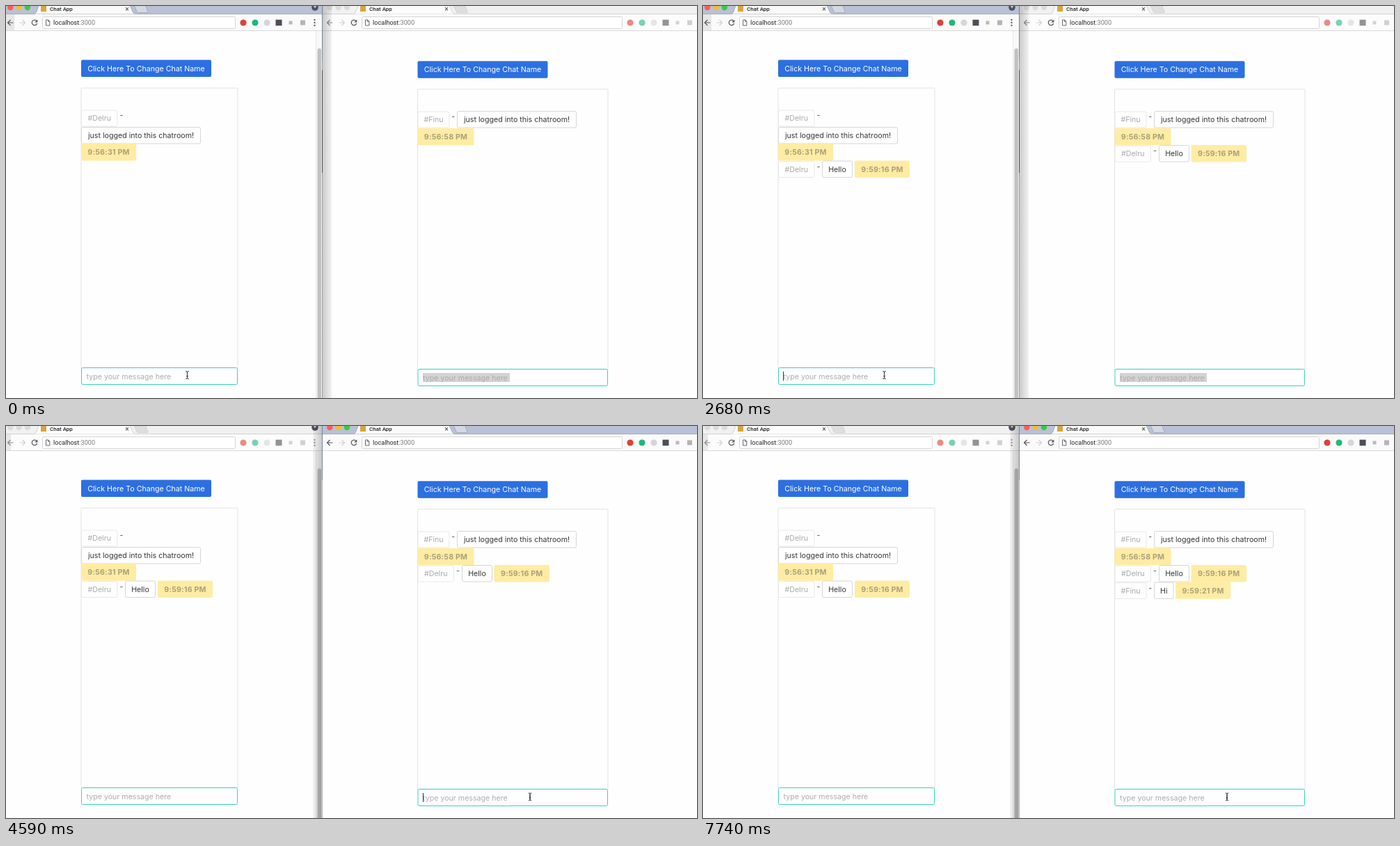
These frames come from a looping animation (993 px wide and 564 px high, 8000 ms). An HTML page:

```html
<!DOCTYPE html>
<html lang="en">
<head>
<meta charset="utf-8">
<title>Chat App</title>
<style>
  html, body { margin: 0; width: 100%; height: 100%; overflow: hidden; background: #fefefe; }
  svg { display: block; width: 993px; height: 564px; }
  text { font-family: Inter, "Open Sans", sans-serif; font-size: 10.65px; white-space: pre; }
  .ui { font-family: Roboto, Arial, sans-serif; font-size: 9.15px; }
  .tab { font-family: Roboto, Arial, sans-serif; font-size: 8px; font-weight: 500; }
  .time { font-weight: 700; letter-spacing: .2px; }
</style>
</head>
<body>
<svg id="stage" viewBox="0 0 993 564" xmlns="http://www.w3.org/2000/svg"></svg>
<script>
const LOOP = 8000;
const HINT = 'type your message here';
const USERS = ['#Delru', '#Finu'];
const stage = document.getElementById('stage');

// Each step changes part of the state and holds until the next one.
const steps = [
  [0, { active: 0, left: '', leftCaret: 0, right: '', rightCaret: 0, select: '#d3d3d3',
        hello: 0, hi: 0, cursor: ['beam', 260.5, 525.5] }],
  [180, { left: 'H', leftCaret: 123.5 }],
  [470, { left: 'Hell', leftCaret: 135.5 }],
  [830, { left: 'Hello', leftCaret: 141.5 }],
  [1280, { leftCaret: 0 }],
  [1460, { left: '', leftCaret: 115.5 }],
  [1640, { hello: 1 }],
  [2180, { leftCaret: 0 }],
  [2680, { leftCaret: 115.5 }],
  [3010, { cursor: null }],
  [3190, { leftCaret: 0, cursor: ['arrow', 652, 562.5] }],
  [3370, { cursor: ['arrow', 709.5, 544] }],
  [3540, { leftCaret: 115.5, cursor: ['arrow', 718, 531] }],
  [3750, { active: 1, leftCaret: 0, select: '#ffff00', cursor: ['beam', 753.5, 527] }],
  [4290, { select: '', rightCaret: 599.5 }],
  [4590, { cursor: ['beam', 753, 528] }],
  [4770, { rightCaret: 0 }],
  [5270, { rightCaret: 599.5 }],
  [5780, { rightCaret: 0 }],
  [6140, { right: 'H', rightCaret: 607.5 }],
  [6280, { right: 'Hi', rightCaret: 609.5 }],
  [6790, { rightCaret: 0 }],
  [7110, { right: '', rightCaret: 599.5, hi: 1 }],
  [7740, { rightCaret: 0 }]
];
const states = [];
steps.forEach(([at, change], i) => states.push({ ...states[i - 1], ...change, at }));

const rect = (x, y, w, h, fill, extra = '') =>
  `<rect x="${x}" y="${y}" width="${w}" height="${h}" fill="${fill}" ${extra}/>`;
const frame = (x, y, w, h, stroke, fill = '#fefefe', r = 2) =>
  rect(x + .5, y + .5, w - 1, h - 1, fill, `stroke="${stroke}" rx="${r}"`);
const disc = (x, y, r, fill) => `<circle cx="${x}" cy="${y}" r="${r}" fill="${fill}"/>`;
const line = (d, stroke, w = 1) =>
  `<path d="${d}" fill="none" stroke="${stroke}" stroke-width="${w}"/>`;
const shape = (d, fill, stroke = 'none') => `<path d="${d}" fill="${fill}" stroke="${stroke}"/>`;
const text = (x, y, s, fill, cls = '') =>
  `<text x="${x}" y="${y}" fill="${fill}" class="${cls}">${s}</text>`;
const label = (x, w, y, s, fill, cls = '') =>
  `<text x="${x + w / 2}" y="${y}" fill="${fill}" class="${cls}" text-anchor="middle">${s}</text>`;

function chrome(x, barEnd, extX, active) {
  const strip = active ? '#b8c1d5' : '#f1f1f1';
  const edge = active ? '#a3abbd' : '#d2d2d2';
  const lights = active ? ['#fc5d58', '#f1bd34', '#3dc845'] : ['#dcdcdc', '#dcdcdc', '#dcdcdc'];
  const bar = active ? '#fafafa' : '#fcfcfc';
  const ext = [[0, '#de4138'], [17, '#20b77c'], [34, '#d6d6d6']]
    .map(([dx, c]) => disc(extX + dx, 24, 4.6, c)).join('');
  return rect(x - 5, 0, 545, 12, strip) +
    rect(x - 5, 11, 545, 25, bar) +
    line(`M${x - 5} 11.5H${x + 540}`, edge) +
    shape(`M${x + 39} 12Q${x + 43} 11 ${x + 44} 8L${x + 47} -1H${x + 178}L${x + 182} 8Q${x + 183} 11 ${x + 187} 12Z`, bar, edge) +
    rect(x + 38, 12, 150, 2, bar) +
    shape(`M${x + 184} -1L${x + 188} 8Q${x + 188.5} 9.5 ${x + 190} 9.5H${x + 203}Q${x + 205} 9.5 ${x + 204} 8L${x + 200.5} -1Z`,
      active ? '#d3d8e3' : '#dedede', edge) +
    lights.map((c, i) => disc(x + 6.3 + i * 12.3, 2, 4.2, c)).join('') +
    rect(x + 50, 0, 8, 8, '#d9a441') +
    text(x + 63, 7, 'Chat App', '#222', 'tab') +
    line(`M${x + 172} 2l4 4.4m0-4.4l-4 4.4`, '#555', 1.1) +
    line(`M${x - 5} 35.5H${x + 540}`, '#d8d8d8') +
    (x ? '' : rect(0, 12, active ? 12 : 7, 23, '#000', 'opacity=".08"')) +
    line(`M${x + 10.5} 24H${x + 3}M${x + 6.5} 20l-4 4l4 4`, active ? '#555' : '#8a8a8a', 1.2) +
    line(`M${x + 19.5} 24H${x + 27}M${x + 23.5} 20l4 4l-4 4`, '#d0d0d0', 1.2) +
    line(`M${x + 44} 21.4A3.8 3.8 0 1 0 ${x + 44.7} 25`, '#555', 1.2) +
    shape(`M${x + 45.3} 19.5v4h-4z`, '#555') +
    frame(x + 52, 15, barEnd - x - 52, 18, '#d4d4d4', '#fff') +
    line(`M${x + 57.5} 20h3.3l2 2v6h-5.3zM${x + 60.5} 20v2.3h2.3`, '#666') +
    text(x + 68, 27.2, 'localhost<tspan fill="#777">:3000</tspan>', '#222', 'ui') +
    `<g opacity="${active ? 1 : .6}">${ext}` +
    rect(extX + 46.5, 19.7, 9, 8.6, '#4b4e55') +
    rect(extX + 65.5, 21.5, 5, 5, '#b9b9b9') +
    rect(extX + 82, 20.5, 7, 7, '#b4b4b4') +
    [20, 24, 28].map(y => disc(extX + 102.5, y, 1.15, '#555')).join('') + '</g>';
}

// One chat row item, placed by its left edge, width and top.
const tag = (x, w, y, s) => frame(x, y, w, 24, '#e8e8e8') + label(x, w, y + 15.8, s, '#a9a9a9');
const bubble = (x, w, y, s) => frame(x, y, w, 24.5, '#d6d6d6') + label(x, w, y + 16, s, '#363636');
const pill = (x, w, y, s) =>
  rect(x, y, w, 24.5, '#ffeca3', 'rx="2"') + label(x, w, y + 16.3, s, '#a9a07c', 'time');
const dash = (x, y) => text(x, y, '-', '#4a4a4a');

function input(x, y, w, value, caret, select) {
  return frame(x, y, w, 25, '#35d3bd') +
    (select ? rect(x + 7.5, y + 6, 125, 13, select) : '') +
    text(x + 7.5, y + 16.6, value || HINT, value ? '#363636' : '#adadad') +
    (caret ? line(`M${caret} ${y + 6}v13`, '#333') : '');
}

function page(x, y, w) {
  return rect(x, y, 187, 24.5, '#2c6fe0', 'rx="2"') +
    label(x, 187, y + 16, 'Click Here To Change Chat Name', '#fff') +
    frame(x - .5, y + 40, w + 1, 405, '#e2e2e2', '#fefefe', 1);
}

function cursor([kind, x, y]) {
  if (kind === 'beam')
    return line(`M${x - 2.2} ${y}q2.2 0 2.2 1.5v8q0 1.5-2.2 1.5M${x + 2.2} ${y}q-2.2 0-2.2 1.5v8q0 1.5 2.2 1.5M${x - 1.3} ${y + 7}h2.6`, '#333');
  return `<path d="M${x} ${y}v9l2-1.8l1.6 3.6l1.6-.7l-1.6-3.5h2.7z" fill="#000" stroke="#fff" stroke-width=".6"/>`;
}

function leftWindow(s) {
  return rect(0, 0, 454, 564, '#fefefe') + chrome(0, 330, 341, !s.active) +
    disc(444, 2, 4.8, '#4d5261') + disc(444, 1, 1.5, '#cdd2de') +
    rect(445, 36, 9, 528, '#f8f8f8') + line('M445.5 36V564', '#e9e9e9') +
    rect(447.5, 61, 5.5, 520, '#c1c1c1', 'rx="2.7"') +
    page(108, 77.5, 225) +
    tag(108, 52.5, 149.5, USERS[0]) + dash(163.5, 161) +
    bubble(108, 172, 174, 'just logged into this chatroom!') +
    pill(108, 79, 198, '9:56:31 PM') +
    (s.hello ? tag(108, 52.5, 223, USERS[0]) + dash(163.5, 234.5) +
      bubble(171, 44, 222.5, 'Hello') + pill(218, 79, 222.5, '9:59:16 PM') : '') +
    input(108, 520, 225, s.left, s.leftCaret);
}

function rightWindow(s) {
  return rect(455, 0, 538, 564, '#fefefe') + chrome(459, 886, 897, s.active) +
    page(591.5, 79.2, 273.5) +
    tag(591.5, 46, 151.5, USERS[1]) + dash(640.2, 163) +
    bubble(648, 172, 151, 'just logged into this chatroom!') +
    pill(591.5, 81, 175.7, '9:56:58 PM') +
    (s.hello ? tag(591.5, 52.5, 200.5, USERS[0]) + dash(647, 212) +
      bubble(655, 44, 200, 'Hello') + pill(701.5, 79.5, 200, '9:59:16 PM') : '') +
    (s.hi ? tag(591.5, 46, 225, USERS[1]) + dash(640.2, 236.5) +
      bubble(648, 28.5, 224.5, 'Hi') + pill(679, 79, 224.3, '9:59:21 PM') : '') +
    input(591.5, 522, 273.5, s.right, s.rightCaret, s.select);
}

const defs = `<defs>
  <linearGradient id="s0"><stop stop-opacity=".2"/><stop offset="1" stop-opacity=".05"/></linearGradient>
  <linearGradient id="s1"><stop stop-opacity=".04"/><stop offset="1" stop-opacity=".2"/></linearGradient>
  <clipPath id="c0"><path d="M0 0H454.5V564H0z"/></clipPath>
  <clipPath id="c1"><path d="M454.5 0H993V564H454.5z"/></clipPath></defs>`;

function scene(s) {
  const seam = s.active
    ? rect(454, 0, 1, 564, '#b0b0b0') + rect(454, 0, 1, 78, '#77869c')
    : rect(454, 0, 1, 564, '#9a9a9c') + rect(454, 0, 1, 78, '#77869c') + rect(454, 92, 1, 148, '#48484c');
  return defs +
    `<g clip-path="url(#c0)">${leftWindow(s)}</g><g clip-path="url(#c1)">${rightWindow(s)}</g>` +
    (s.active ? rect(441, 0, 13, 564, 'url(#s1)') : rect(455, 0, 13, 564, 'url(#s0)')) +
    seam + (s.cursor ? cursor(s.cursor) : '');
}

const start = performance.now();
let shown = null;
function draw() {
  const t = (performance.now() - start) % LOOP;
  const s = states.filter(state => state.at <= t).pop();
  if (s !== shown) {
    stage.innerHTML = scene(s);
    shown = s;
  }
  requestAnimationFrame(draw);
}
draw();
</script>
</body>
</html>
```
